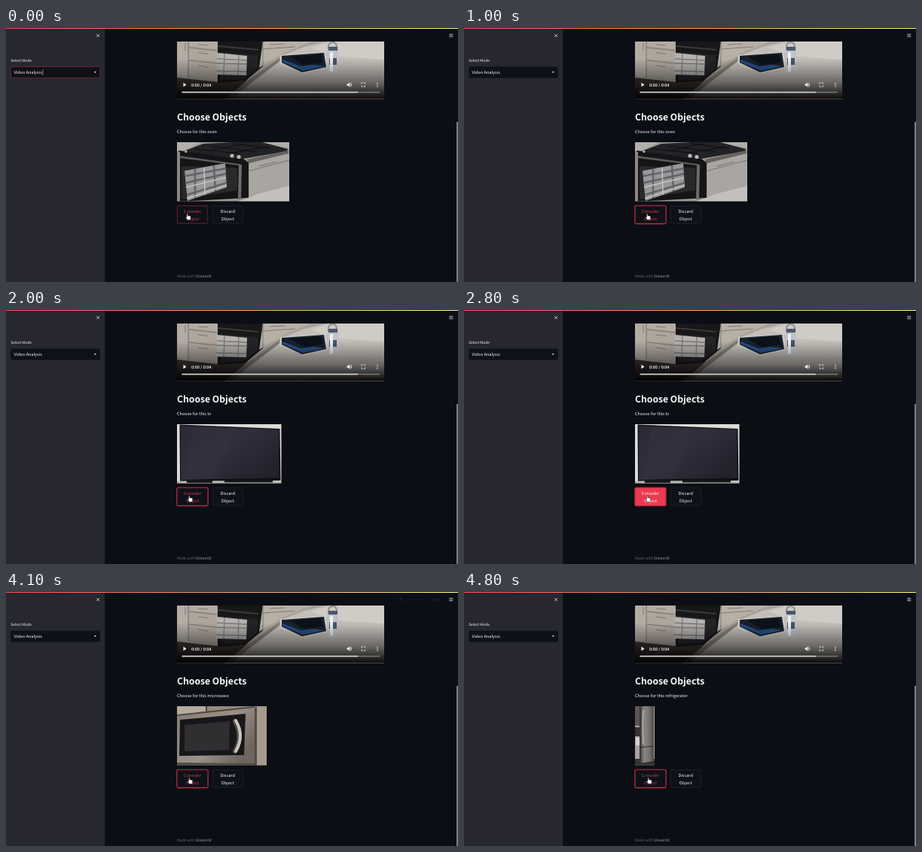
Recreate the animation shown at these times as an HTML page. Size 600x338 px, loop 6 s.

```html
<!DOCTYPE html>
<html lang="en">
<head>
<meta charset="utf-8">
<title>Choose Objects</title>
<style>
html, body { margin: 0; width: 100%; height: 100%; overflow: hidden; background: #0b0e15; }
#stage { display: block; width: 100vw; height: 100vh; }
text { font-family: "Noto Sans CJK JP", "Noto Sans CJK SC", "Noto Sans CJK", "Open Sans", sans-serif; font-size: 5.6px; font-weight: 500; fill: #fafafa; text-rendering: geometricPrecision; }
.small { font-size: 4.9px; }
.mid { text-anchor: middle; }
.time { font: 500 5.47px Roboto, sans-serif; }
.line { fill: none; stroke: #fafafa; }
</style>
</head>
<body>
<svg id="stage" viewBox="0 0 600 338" preserveAspectRatio="none">
<defs>
  <linearGradient id="bar"><stop stop-color="#ff4b4b"/><stop offset="1" stop-color="#fffd80"/></linearGradient>
  <linearGradient id="shade" x2="0" y2="1"><stop offset=".3" stop-opacity="0"/><stop offset=".7" stop-opacity=".45"/><stop offset="1" stop-opacity=".96"/></linearGradient>
  <linearGradient id="screen" y2=".7"><stop stop-color="#2b2935"/><stop offset=".5" stop-color="#312f3b"/><stop offset="1" stop-color="#23212c"/></linearGradient>
  <linearGradient id="steel" y2=".6"><stop stop-color="#857d74"/><stop offset=".6" stop-color="#9a9289"/><stop offset="1" stop-color="#6d655e"/></linearGradient>
  <linearGradient id="door"><stop stop-color="#3f3d3b"/><stop offset=".35" stop-color="#8b8885"/><stop offset=".7" stop-color="#72706d"/><stop offset="1" stop-color="#4c4947"/></linearGradient>
</defs>

<rect width="600" height="338" fill="#0b0e15"/>

<!-- video -->
<svg x="227" y="18" width="275" height="76.500" viewBox="227 18 275 76.500">
  <path fill="#a8a199" d="M227 18h276v77h-276z"/>
  <path fill="#3d3632" d="M227 66l54 6 40-4-26 27h-68z"/>
  <path fill="#b3aca3" d="M227 18h14v48l-14-3zM243 18h37v10l-37-4z"/>
  <path fill="#aea69d" d="M243 27l37 4v14l-37-4zM243 44l37 4v21l-37-6z"/>
  <path fill="none" stroke="#5b544e" stroke-width=".6" d="M242 18v48M243 26l37 4M243 43l37 4M255 22l13 1M255 33l13 1.500M255 50l13 2M238 20v10"/>
  <path fill="#171719" d="M281 18h60v33l-23 19-37 3z"/>
  <path fill="#3a3a3d" d="M281 23l54 5v2l-54-5z"/>
  <path fill="#242327" d="M284 32l50 4v18l-18 14-32 2z"/>
  <path fill="#b5b2af" d="M280 33l40 4-1 26-40-1z"/>
  <path fill="none" stroke="#7b7a7c" stroke-width="1.300" d="M280 41l40 2M279.500 47l40 1M279 57l40 1M290 34l-1 28M309 36l-1 27"/>
  <path fill="#b7b0a7" d="M341 18h64l-38 16-31 19z"/>
  <path fill="none" stroke="#6b645d" stroke-width=".7" d="M341 28l43-3M341 18v32M350 22l20-1"/>
  <path fill="#c3beb8" d="M318 72l50-36 28-11 30-7h77v77H290z"/>
  <path fill="#cfcbc5" d="M404 26l30-8h69v24l-62-4z"/>
  <path fill="#857e77" d="M318 72l50-36 1 4-46 35-24 20h-9z"/>
  <path fill="#d0ccc7" d="M364 36l60-4 4 21-34 8-31-13z"/>
  <path fill="#17212e" d="M366 37l56-4 3 19-32 7-27-13z"/>
  <path fill="#274e85" d="M367 42l24 9 18-2 14 2-29 6-27-12z"/>
  <path fill="#0d1119" d="M376 38l42-3 3 11-26 3z"/>
  <path fill="none" stroke="#8d9299" stroke-width="2.200" d="M428 36V24q1-5 6-5 5 0 5 7v9"/>
  <rect x="427" y="27" width="14" height="34" rx="2" fill="#bfc3c7"/>
  <path fill="#4b5768" d="M428 25h12v5h-12zM429 40h10v9h-10z"/>
  <path fill="#eceeef" d="M430 32h4v26h-4z"/>
  <rect x="227" y="18" width="276" height="77" fill="url(#shade)"/>
</svg>
<g fill="#fff">
  <path d="M235.500 72.800l4 2.700-4 2.700z"/>
  <text class="time" x="246" y="77.500">0:00 / 0:04</text>
  <path d="M452.500 74.500h1.500l2-2v6l-2-2h-1.500z"/>
  <path fill="none" stroke="#fff" stroke-width=".7" d="M456.800 74q1.400 1.500 0 3M457 72.400q3.300 3 0 6.200M472 74.500v-1.700h1.700M474.900 72.800h1.700v1.700M476.600 76.500v1.700h-1.700M473.700 78.200H472v-1.700"/>
  <circle cx="493" cy="73.400" r=".7"/><circle cx="493" cy="75.600" r=".7"/><circle cx="493" cy="77.800" r=".7"/>
  <rect x="233.300" y="84.800" width="263" height="1.500" rx=".7" fill="#77777a"/>
  <rect x="233.300" y="84.800" width="234" height="1.500" rx=".7" fill="#d6d6d6"/>
</g>

<text x="227" y="123" style="font-size:12.2px;font-weight:700">Choose Objects</text>
<text id="prompt" x="227" y="140"></text>

<!-- detected objects -->
<svg class="photo" x="227" y="152" width="149" height="78.500" viewBox="227 152 149 78.500">
  <path fill="#9b9894" d="M227 152h149v79H227z"/>
  <path fill="#b3b0ab" d="M227 152h32l-19 10-13 2z"/>
  <path fill="#a9a6a1" d="M323 180l53-14v46l-53 14z"/>
  <path fill="#b0ada8" d="M336 152h40v8z"/>
  <path fill="#222326" d="M238 163l24-9 40-2h38l34 9-1 3-58 10-77-9z"/>
  <path fill="none" stroke="#0e0e10" d="M250 161l60 6M270 157l64 8M300 154l52 6M268 164l50-10M296 167l50-9"/>
  <path fill="#151517" d="M229 163l86 11 7 5v47l-93 5z"/>
  <path fill="#5a5a5d" d="M230 170l80 11v2l-80-10z"/>
  <path fill="#29292c" d="M233 184l74 2v30l-74 12z"/>
  <path fill="#6d6c6b" d="M309 181l4 1-1 46h-4z"/>
  <path fill="#66635f" d="M320 175l55-12v4l-53 13z"/>
  <g fill="#b7b7b8"><circle cx="300" cy="170" r="2.600"/><circle cx="309" cy="171.500" r="2.600"/><circle cx="239" cy="164.500" r="1.600"/></g>
  <path fill="none" stroke="#6b6863" stroke-width=".8" d="M323 190l53-14M335 184l24-6"/>
  <path fill="#98989a" d="M237 190l54-10 2 32-52 18z"/>
  <path fill="none" stroke="#646468" stroke-width="2.500" d="M238 197l53-10M239 206l53-12M240 222l53-16M251 188v38M276 183l2 34"/>
  <path fill="none" stroke="#c4c4c4" stroke-width="1.500" d="M239 212l53-13M240 227l53-18M263 186l1 36"/>
  <path fill="#c3c0bc" d="M308 231l26-10 42-11v21z"/>
  <path fill="#8a8783" d="M227 164l4 1v66h-4z"/>
</svg>
<svg class="photo" x="227" y="152" width="138.500" height="78.500" viewBox="227 152 138.500 78.500">
  <path fill="#dcdcda" d="M227 152h139v79H227z"/>
  <path fill="#111016" d="M230.500 152.500l133 5.500 1 69-133.500 1z"/>
  <path fill="url(#screen)" d="M232 154l130 5 .5 64.500-130.500 2.500z"/>
  <path fill="#393743" opacity=".3" d="M248 155l55 2-24 67-40 1z"/>
  <path fill="#b5b4b2" d="M227 227.500l138 .5v2.500H227z"/>
  <path fill="#19181c" d="M240 227h34v3h-34zM290 227h64v2.500h-64z"/>
</svg>
<svg class="photo" x="227" y="152" width="119" height="78.500" viewBox="227 152 119 78.500">
  <path fill="#958a7e" d="M227 152h119v79H227z"/>
  <path fill="#b4aa9e" d="M227 152h38v7l-38 5z"/>
  <path fill="#51483f" d="M265 152h2v8h-2zM227 163l103-11v2l-103 12z"/>
  <path fill="url(#steel)" d="M227 165l104-11-1 76-103-4z"/>
  <path fill="#17161a" d="M231 170l87-8-2 55-86 1z"/>
  <path fill="#302e30" d="M237 177l60-5-1 38-59 2z"/>
  <path fill="#544c45" d="M227 227l103 1v3H227zM330 154l3-1v77h-3z"/>
  <path fill="#a69b8e" d="M333 152h13v79h-13z"/>
  <path fill="none" stroke="#544f4b" stroke-width="6" stroke-linecap="round" d="M304 172q11 20 0 40"/>
  <path fill="none" stroke="#c9c4be" stroke-width="4" stroke-linecap="round" d="M305 171q12 20 0 41"/>
</svg>
<svg class="photo" x="227" y="152" width="26" height="78.500" viewBox="227 152 26 78.500">
  <path fill="#a8a39d" d="M227 152h26v79h-26z"/>
  <path fill="#5b5651" d="M227 152h7v26h-7z"/>
  <path fill="#37332f" d="M227 180h6v12h-6zM227 222h26v9h-26z"/>
  <path fill="#d4d1cd" d="M228 194h5v10h-5z"/>
  <path fill="url(#door)" d="M233 152h19v73l-19 3z"/>
  <path fill="none" stroke="#2b2826" d="M234 152v76M233 207l19-2"/>
  <path fill="none" stroke="#c8c5c1" stroke-width="1.200" d="M238 157q-1.500 22 0 46"/>
</svg>

<!-- buttons -->
<rect id="ring" x="226.800" y="236.200" width="41.400" height="24.400" rx="2" fill="none" stroke="#b32c40" stroke-width="1.100"/>
<rect id="consider" x="227.300" y="236.700" width="40.400" height="23.400" rx="1.600" stroke="#c83246" stroke-width=".5"/>
<g id="label"><text class="mid" x="247.500" y="245.600" style="fill:inherit">Consider</text><text class="mid" x="247.500" y="255.600" style="fill:inherit">Object</text></g>
<rect x="274.200" y="236.700" width="40.200" height="23.400" rx="1.600" fill="#0e1119" stroke="#30333b" stroke-width=".5"/>
<text class="mid" x="294.200" y="245.600">Discard</text><text class="mid" x="294.200" y="255.600">Object</text>
<text class="small" x="227" y="332" style="fill:#65686e">Made with <tspan fill="#a2a4a8">Streamlit</tspan></text>

<!-- sidebar -->
<rect width="131.250" height="338" fill="#262730"/>
<path class="line" stroke-width=".7" d="M120.200 8.200l3.800 3.800m0-3.800l-3.800 3.800"/>
<text class="small" x="6.200" y="45.300">Select Mode</text>
<rect id="select" x="6.400" y="51.400" width="118.500" height="15" rx="1.600" fill="#0e1117" stroke-width=".5"/>
<text x="10.600" y="61">Video Analysis</text>
<path id="caret" class="line" stroke-width=".5" d="M49 55v8"/>
<path fill="#fafafa" d="M116.700 58.100h3.200l-1.600 1.700z"/>

<!-- header -->
<g id="status">
  <g fill="none" stroke="#85878d" stroke-width=".9" stroke-linecap="round">
    <circle cx="524.300" cy="6.300" r=".6"/>
    <path class="pose" d="M521 8.500h6.400M524.200 8.500v2.500M523.200 8.800v5M525.200 8.800v5"/>
    <path class="pose" d="M524.300 8l-1 3 2 1.300-.4 2.200M523.300 11l-1.300 2h-1.500M521.500 9.700l1.200-1.700h1.600l1.200 1.500h1.800"/>
  </g>
  <text class="small" x="532" y="11.700" style="fill:#85878d;font-size:4.700px">RUNNING...</text>
  <text class="small" x="566" y="11.700">Stop</text>
</g>
<path class="line" stroke-width=".6" d="M588.300 8.300h5M588.300 10h5M588.300 11.700h5"/>
<rect x="598" y="125" width="2" height="213" fill="#7d7e81"/>
<rect width="600" height="1" fill="url(#bar)"/>

<path id="hand" fill="#fff" stroke="#111" stroke-width=".5" stroke-linejoin="round" d="M0 .6Q.7-.3 1.400.6V3q.8-.5 1.300.1.800-.4 1.300.2.900-.3 1.200.6V6q0 1.200-.8 2.300H.8Q0 6.900-1.500 5.300-1.600 4.300-.7 4.500L0 5.200z"/>
</svg>

<script>
const $ = id => document.getElementById(id);
const photos = document.querySelectorAll('.photo');
const poses = document.querySelectorAll('.pose');
const names = ['oven', 'oven', 'tv', 'microwave', 'refrigerator'];
const shots = [0, 0, 1, 2, 3];
// each run: mouse press, status gone
const runs = [[100, 700], [1300, 1800], [2800, 3300], [4300, 4800]];
const LOOP = 6000, STEP = 100;

const show = (el, on) => el.style.visibility = on ? 'visible' : 'hidden';
const since = (t, delay) => runs.filter(([press]) => t >= press + delay).length;

function statusOpacity(t) {
  if (t >= 3300 && t < 4300) return .1;
  const run = runs.find(([press, end]) => t > press && t < end);
  return !run ? 0 : t === run[0] + STEP ? .5 : 1;
}

function handX(t) {
  const first = Math.min(1, Math.max(0, (t - 700) / 300));
  const last = Math.min(1, Math.max(0, (t - 4500) / 300));
  return 240 + 2.5 * first + 1.5 * last;
}

function draw(now) {
  const t = Math.floor(now % LOOP / STEP) * STEP;
  const pressed = runs.some(([press]) => t === press);
  const focused = t >= runs[0][0];

  $('prompt').textContent = 'Choose for this ' + names[since(t, 300)];
  photos.forEach((p, i) => show(p, i === shots[since(t, 400)]));

  show($('ring'), focused);
  $('consider').setAttribute('fill', pressed ? '#eb3b50' : '#0e1119');
  $('label').setAttribute('fill', pressed ? '#fafafa' : '#d9344a');
  $('select').setAttribute('stroke', focused ? 'none' : '#b8303f');
  show($('caret'), !focused);

  $('status').setAttribute('opacity', statusOpacity(t));
  poses.forEach((p, i) => show(p, t / STEP % 2 === 1 - i));
  $('hand').setAttribute('transform', `translate(${handX(t)} 247)`);
}

function tick(now) {
  draw(now);
  requestAnimationFrame(tick);
}
draw(0);
requestAnimationFrame(tick);
</script>
</body>
</html>
```
